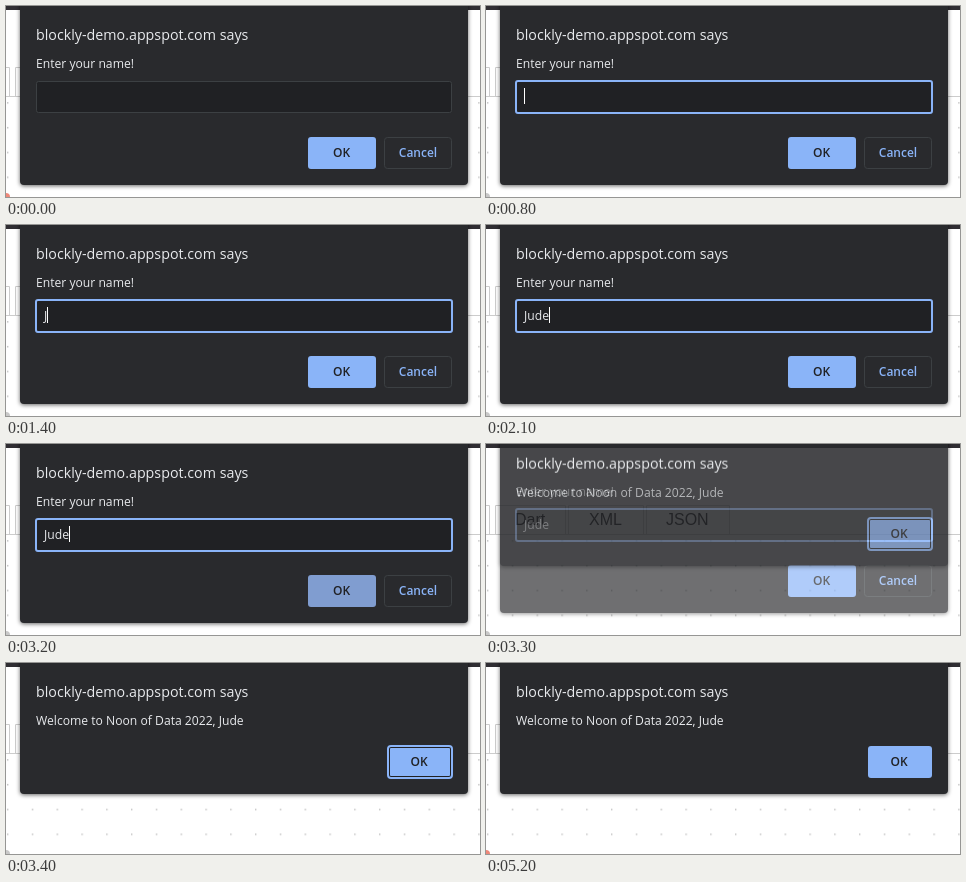
Animation, 474 px wide and 191 px high, one loop 5400 ms. Source, as an HTML page:

```html
<!DOCTYPE html>
<html lang="en">
<head>
<meta charset="utf-8">
<title>Prompt dialog</title>
<style>
  html, body { margin: 0; width: 100%; height: 100%; overflow: hidden; background: #fff; }
  svg { display: block; }
  text { font: 12.15px "Open Sans", sans-serif; fill: #e8eaed; white-space: pre; }
  .title { font-size: 14.25px; }
  .button { font-size: 12px; font-weight: 600; text-anchor: middle; fill: #202124; }
  .link { fill: #8ab4f8; }
  .tab { font: 16px "Liberation Sans", Arial, sans-serif; fill: #111; }
  .panel { fill: #292a2d; filter: drop-shadow(0 1px 2px #0009); }
  .line { fill: none; stroke: #ccc; }
  .ring { fill: #202124; stroke: #8ab4f8; stroke-width: 2; }
  .blue { fill: #8ab4f8; }
</style>
</head>
<body>
<svg width="474" height="191" viewBox="0 0 474 191">
  <defs>
    <pattern id="dots" x="0" y="109" width="24.8" height="24.8" patternUnits="userSpaceOnUse">
      <rect x="1" y="12" width="1.4" height="1.4" fill="#bbb"/>
    </pattern>
  </defs>
  <rect width="474" height="191" fill="#fff"/>
  <rect y="91" width="474" height="100" fill="url(#dots)"/>
  <path class="line" d="M0 90.5H474M0 61.5H3.5V90M9.5 90V61.5H79.5V90M82.5 90V61.5H157.5V90M160.5 90V61.5H243.5V90"/>
  <text class="tab" x="29" y="81">Dart</text>
  <text class="tab" x="103" y="81">XML</text>
  <text class="tab" x="180" y="81">JSON</text>
  <circle id="corner" cx="0" cy="191" r="4"/>
  <rect width="474" height="4" fill="#302e33"/>

  <g id="prompt">
    <rect class="panel" x="14" y="-20" width="448" height="199" rx="4"/>
    <text class="title" x="30" y="34">blockly-demo.appspot.com says</text>
    <text x="30" y="62">Enter your name!</text>
    <rect x="30.5" y="75.5" width="415" height="31" rx="2" fill="#202124" stroke="#3c4043"/>
    <g id="focus">
      <rect class="ring" x="30" y="75" width="416" height="32" rx="2"/>
      <text id="typed" x="38" y="95"></text>
      <rect id="caret" y="82" width="1" height="16" fill="#fff"/>
    </g>
    <rect id="ok" x="302" y="131" width="68" height="32" rx="3"/>
    <text class="button" x="335.5" y="151">OK</text>
    <rect x="378.5" y="131.5" width="67" height="31" rx="3" fill="none" stroke="#3c4043"/>
    <text class="button link" x="412" y="151">Cancel</text>
  </g>

  <g id="alert">
    <rect class="panel" x="14" y="-20" width="448" height="151" rx="4"/>
    <text class="title" x="30" y="34">blockly-demo.appspot.com says</text>
    <text id="welcome" x="30" y="62"></text>
    <rect class="blue" x="382" y="83" width="64" height="32" rx="3"/>
    <rect id="alertRing" class="ring" x="382" y="83" width="64" height="32" rx="3"/>
    <rect class="blue" x="384" y="85" width="60" height="28" rx="1"/>
    <text class="button" x="413" y="103">OK</text>
  </g>
</svg>
<script>
  const LOOP = 5400;
  const NAME = "Jude";
  const KEY_TIMES = [1400, 1700, 1900, 2100];
  const $ = id => document.getElementById(id);
  const within = (t, from, to) => t >= from && t < to;
  const show = (id, on) => $(id).setAttribute("display", on ? "inline" : "none");

  // Dialogs slide up slightly while they cross-fade.
  function pose(id, opacity, dy) {
    show(id, opacity > 0);
    $(id).setAttribute("opacity", opacity);
    $(id).setAttribute("transform", `translate(0 ${dy})`);
  }

  function draw(t) {
    const fading = within(t, 3300, 3400);
    pose("prompt", fading ? 0.67 : t < 3300 ? 1 : 0, fading ? -10 : 0);
    pose("alert", fading ? 0.57 : t < 3400 ? 0 : 1, fading ? -9 : 0);

    const active = within(t, 800, 5200);
    show("focus", active);
    show("alertRing", active);
    $("corner").setAttribute("fill", active ? "#c8c8c8" : "#ee8879");

    $("typed").textContent = NAME.slice(0, KEY_TIMES.filter(k => t >= k).length);
    $("caret").setAttribute("x", Math.round(38 + $("typed").getComputedTextLength()));
    show("caret", !within(t, 1300, 1400) && !within(t, 2600, 3100) && t < 3300);
    $("ok").setAttribute("fill", within(t, 3200, 3300) ? "#809dd0" : within(t, 3000, 3200) ? "#85a9e4" : "#8ab4f8");
  }

  $("welcome").textContent = `Welcome to Noon of Data 2022, ${NAME}`;
  const start = performance.now();
  function tick() {
    draw((performance.now() - start) % LOOP);
    requestAnimationFrame(tick);
  }
  tick();
</script>
</body>
</html>
```
